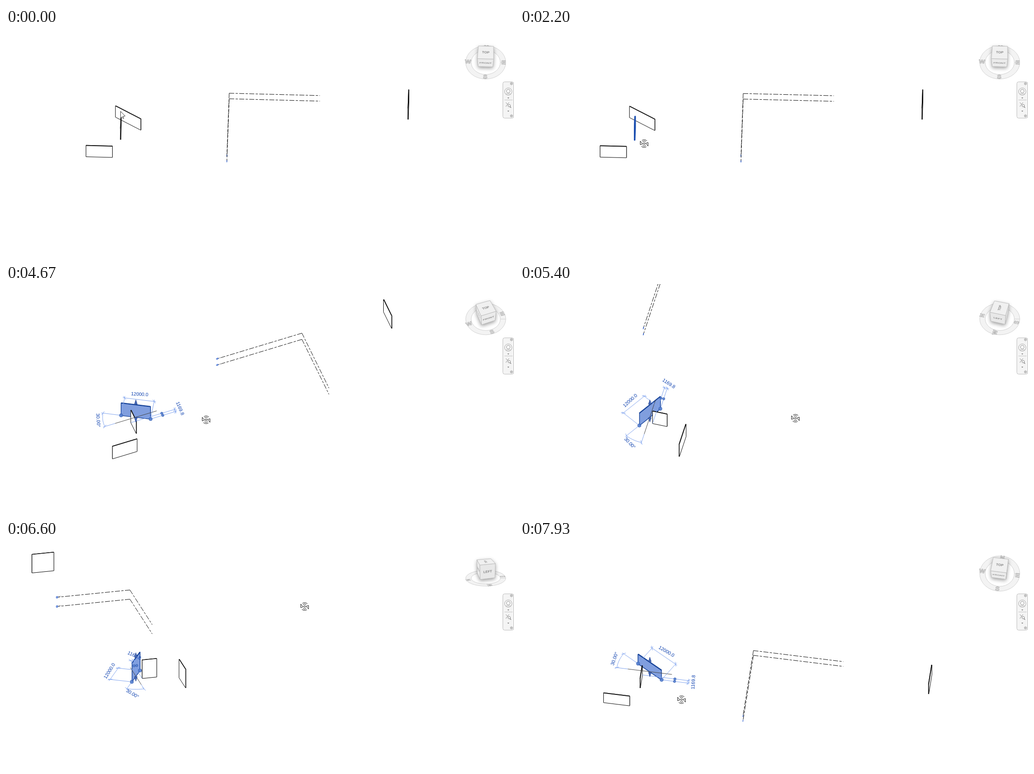
An HTML page with a canvas for the animation above (8000 ms loop, 1115 px wide and 502 px high).

```html
<!DOCTYPE html>
<html lang="en">
<head>
<meta charset="utf-8">
<title>Orbiting walls</title>
<style>
html, body { margin: 0; width: 100%; height: 100%; overflow: hidden; background: #fff; }
canvas { display: block; }
</style>
</head>
<body>
<canvas id="stage" width="1115" height="502"></canvas>
<script>
const g = document.getElementById('stage').getContext('2d');
const LOOP = 8000, STEP = 1000 / 15, RAD = Math.PI / 180;
const SANS = '"Liberation Sans", Arial, sans-serif';
const BLUE = '#1c4fb0', DIM = '#7fa3ee', INK = '#0a0a0a';

// time, yaw, pitch, cursor x, cursor y
const keys = [
  [1600, 1.8, 56.5, 258, 250], [2200, 1.7, 56.3, 272, 254], [2400, -4, 55.2, 290, 246],
  [2850, -24, 54, 338, 238], [3267, -8.5, 50.5, 301, 207], [4334, -8.5, 50.5, 380, 290],
  [5200, -62, 54.5, 565, 305], [5400, -75.3, 52.3, 604, 295], [6067, -116, 37, 690, 215],
  [6600, -104.25, 23.3, 655, 146], [7000, -78, 44, 575, 270], [7400, -40.2, 60.7, 470, 361],
  [7933, 8, 61.7, 354, 351]
];
// time, x, y of the arrow pointer
const arrowKeys = [
  [0, 251, 183], [130, 251, 194], [270, 251, 194], [800, 262, 201],
  [3333, 300, 206], [4000, 283, 272]
];

const TALL = 22.15;             // half the wall height
const wall = (x, y, len, deg) => ({
  x, y, dx: Math.cos(deg * RAD) * len / 2, dy: Math.sin(deg * RAD) * len / 2
});
const A = wall(0, 0, 65.5, -30), B = wall(-60.9, -90.2, 58, 0);
const C = wall(-15.4, -26.8, 33, 90), D = wall(613.6, 54.7, 49.5, 90);
const box = { w: 219.5, e: 418.5, n: 72.2, s: -92.8 };

let cam;

function slope(list, i, c) {
  if (i <= 0 || i >= list.length - 1) return 0;
  const rate = j => (list[j + 1][c] - list[j][c]) / (list[j + 1][0] - list[j][0]);
  const p = rate(i - 1), q = rate(i);
  return p * q <= 0 ? 0 : 2 * p * q / (p + q);
}

function sample(list, t, c) {
  const last = list.length - 1;
  if (t <= list[0][0]) return list[0][c];
  if (t >= list[last][0]) return list[last][c];
  let i = 0;
  while (t > list[i + 1][0]) i++;
  const h = list[i + 1][0] - list[i][0], s = (t - list[i][0]) / h, r = 1 - s;
  return list[i][c] * (1 + 2 * s) * r * r + list[i + 1][c] * (3 - 2 * s) * s * s
    + h * s * r * (slope(list, i, c) * r - slope(list, i + 1, c) * s);
}

function setCamera(t) {
  const yaw = sample(keys, t, 1), pitch = sample(keys, t, 2) * RAD;
  cam = {
    yaw, ca: Math.cos(yaw * RAD), sa: Math.sin(yaw * RAD),
    ce: Math.cos(pitch), se: Math.sin(pitch), ox: 284.5, oy: 279
  };
  if (t < 4390) {
    const [x, y] = turn(D.x, D.y, 0);
    cam.ox = 882.8 - x;
    cam.oy = 168 - y;
  }
}

const depth = (x, y) => y * cam.ca - x * cam.sa;
const turn = (x, y, z) => [x * cam.ca + y * cam.sa, -depth(x, y) * cam.se - z * cam.ce];
function at(x, y, z) {
  const p = turn(x, y, z);
  return [p[0] + cam.ox, p[1] + cam.oy];
}
const floor = (x, y) => at(x, y, -TALL);

function path(pts, closed) {
  g.beginPath();
  pts.forEach(p => g.lineTo(p[0], p[1]));
  if (closed) g.closePath();
}
function line(pts, color, width = 1) {
  path(pts);
  g.strokeStyle = color;
  g.lineWidth = width;
  g.stroke();
}
function shape(pts, fill, color, width = 1) {
  path(pts, true);
  g.fillStyle = fill;
  g.fill();
  g.strokeStyle = color;
  g.lineWidth = width;
  g.stroke();
}
function disc(x, y, r, fill, color) {
  g.beginPath();
  g.arc(x, y, r, 0, 7);
  if (fill) { g.fillStyle = fill; g.fill(); }
  g.strokeStyle = color;
  g.lineWidth = 1;
  g.stroke();
}

function drawWall(w, hot, picked) {
  const len = Math.hypot(w.dx, w.dy), nx = -w.dy / len * .5, ny = w.dx / len * .5;
  const side = depth(nx, ny) > 0 ? 1 : -1;
  const quad = k => [[-1, 1], [1, 1], [1, -1], [-1, -1]].map(([s, z]) =>
    at(w.x + w.dx * s + nx * k, w.y + w.dy * s + ny * k, z * TALL));
  const back = quad(side), front = quad(-side);
  const color = picked ? '#123f96' : hot ? BLUE : INK, width = hot ? 2.4 : picked ? 1.4 : 1;
  g.lineJoin = 'round';
  if (!picked) shape(back, '#fff', color, width);
  shape(front, picked ? 'rgba(74,118,208,.7)' : '#fff', color, width);
  line([back[0], back[1]], color, width);
}

function drawLevels() {
  const corners = [[box.w, box.n], [box.e, box.n], [box.e, box.s], [box.w, box.s]];
  let far = 0;
  corners.forEach((c, i) => { if (depth(...c) > depth(...corners[far])) far = i; });
  const mid = corners[far], right = corners[(far + 1) % 4], left = corners[(far + 3) % 4];
  for (const z of [0, -TALL]) {
    const m = at(...mid, z), l = at(...left, z);
    g.setLineDash([11, 3, 5, 3]);
    line([m, l], INK);
    line([m, at(...right, z)], INK);
    g.setLineDash([]);
    drawHead(l, m);
  }
}

// A small disc standing upright in the plane of its level line.
function drawHead(p, m) {
  const span = box.e - box.w, ux = (m[0] - p[0]) / span, uy = (m[1] - p[1]) / span;
  g.save();
  g.transform(ux, uy, 0, cam.ce, p[0], p[1]);
  g.beginPath();
  g.arc(0, 0, 2.3, 0, 7);
  g.restore();
  g.fillStyle = '#9db9ee';
  g.fill();
  g.strokeStyle = '#2456c8';
  g.lineWidth = 1;
  g.stroke();
  if (Math.abs(ux) > .75) line([[p[0] + 3, p[1] - 1.5], [p[0] + 10, p[1] - 2.5]], '#aaa');
}

function label(text, x, y, deg) {
  g.save();
  g.translate(x, y);
  g.rotate((deg - 180 * Math.round(deg / 180)) * RAD);
  g.font = '10.5px ' + SANS;
  g.textAlign = 'center';
  g.textBaseline = 'middle';
  g.fillStyle = '#0b3fae';
  g.fillText(text, 0, 0);
  g.restore();
}

function tick([x, y], deg) {
  const c = Math.cos((deg + 45) * RAD) * 5, s = Math.sin((deg + 45) * RAD) * 5;
  line([[x - c, y - s], [x + c, y + s]], DIM);
}

// Dimension text and ticks for a segment, placed away from the wall.
function measure(text, p, q, skew, gap) {
  const deg = Math.atan2(q[1] - p[1], q[0] - p[0]) / RAD, turned = deg + skew;
  const base = floor(0, 0), mx = (p[0] + q[0]) / 2, my = (p[1] + q[1]) / 2;
  let nx = -Math.sin(turned * RAD), ny = Math.cos(turned * RAD);
  if (nx * (mx - base[0]) + ny * (my - base[1]) < 0) { nx = -nx; ny = -ny; }
  tick(p, deg);
  tick(q, deg);
  label(text, mx + nx * gap, my + ny * gap, turned);
}

function longer(p, q, by) {
  const d = Math.hypot(q[0] - p[0], q[1] - p[1]) || 1;
  return [q[0] + (q[0] - p[0]) / d * by, q[1] + (q[1] - p[1]) / d * by];
}

function drawDims() {
  const skew = -6 - (cam.yaw - 8) * .33;
  const ends = [-1, 1].map(s => [A.dx * s, A.dy * s]);
  line([floor(-49, 0), floor(49, 0)], '#444');

  const off = ends.map(([x, y]) => floor(x + 24.8, y + 42.9));
  ends.forEach((e, i) => {
    const p = floor(...e);
    line([longer(off[i], p, -5), longer(p, off[i], 4)], DIM);
  });
  line([longer(off[1], off[0], 4), longer(off[0], off[1], 4)], DIM);
  measure('12000.0', off[0], off[1], -4, 11.5);

  const ray = (deg, r) => floor(Math.cos(deg * RAD) * r, Math.sin(deg * RAD) * r);
  const arc = [];
  for (let d = 150; d <= 180; d += 3) arc.push(ray(d, 73));
  line(arc, DIM);
  line([ray(150, 33), ray(150, 77)], DIM);
  line([ray(180, 49), ray(180, 77)], DIM);
  measure('30.00°', arc[0], arc[arc.length - 1], skew, 13);

  const y1 = -10.3, y2 = -16.5, p = floor(87, y1), q = floor(87, y2);
  line([floor(-15.4, y1), floor(90, y1)], DIM);
  line([floor(28.4, y2), floor(90, y2)], DIM);
  line([longer(q, p, 4), longer(p, q, 4)], DIM);
  measure('1169.8', p, q, skew, 11.5);

  const knob = 'rgba(84,126,208,.85)', rim = '#3a64b4';
  [y1, y2].forEach(y => disc(...floor(57, y), 2.6, knob, rim));
  ends.forEach(e => disc(...floor(...e), 3.7, knob, rim));
  const reach = TALL * cam.ce + 1;
  for (const s of [-1, 1]) {
    const y = cam.oy + s * reach, x = cam.ox;
    shape([[x - 3.2, y], [x + 3.2, y], [x, y + s * 10]], '#4468b8', '#27458c', .8);
  }
}

function drawCompass() {
  const cx = 1052.5, cy = 62.5, ringY = cy + 23 * cam.ce;
  g.beginPath();
  g.ellipse(cx, ringY, 44, 44 * cam.se, 0, 0, 7);
  g.ellipse(cx, ringY, 32, 32 * cam.se, 0, 0, 7);
  g.fillStyle = '#f3f3f3';
  g.fill('evenodd');
  g.strokeStyle = '#d2d2d2';
  g.lineWidth = 1;
  g.stroke();

  g.textAlign = 'center';
  g.textBaseline = 'middle';
  [['N', 0, 1], ['E', 1, 0], ['S', 0, -1], ['W', -1, 0]].forEach(([s, x, y]) => {
    const p = turn(x * 39, y * 39, -23);
    g.save();
    g.translate(cx + p[0], cy + p[1]);
    g.scale(1, cam.se);
    g.rotate(cam.yaw * RAD);
    g.font = 'bold 14px ' + SANS;
    g.fillStyle = '#f6f6f6';
    g.strokeStyle = '#a9a9a9';
    g.lineWidth = 1;
    g.fillText(s, 0, 0);
    g.strokeText(s, 0, 0);
    g.restore();
  });
  drawCube(cx, cy);
}

function drawCube(cx, cy) {
  const H = 16.3;
  const spot = (x, y, z) => {
    const p = turn(x, y, z), near = z * cam.se - depth(x, y) * cam.ce, k = 1 + near * .004;
    return [cx + p[0] * k, cy + p[1] * k];
  };
  // name, normal, text right, text up, shade
  const faces = [
    ['FRONT', [0, -1, 0], [1, 0, 0], [0, 0, 1], '#ebebeb'],
    ['BACK', [0, 1, 0], [-1, 0, 0], [0, 0, 1], '#ebebeb'],
    ['LEFT', [-1, 0, 0], [0, -1, 0], [0, 0, 1], '#e8e8e8'],
    ['RIGHT', [1, 0, 0], [0, 1, 0], [0, 0, 1], '#e8e8e8'],
    ['TOP', [0, 0, 1], [1, 0, 0], [0, 1, 0], '#f0f0f0']
  ].filter(f => f[1][2] * cam.se - depth(f[1][0], f[1][1]) * cam.ce > .02);
  const point = (n, r, u, a, b) => spot(...n.map((v, i) => (v + r[i] * a + u[i] * b) * H));
  const quad = ([, n, r, u]) =>
    [[-1, 1], [1, 1], [1, -1], [-1, -1]].map(([a, b]) => point(n, r, u, a, b));

  g.save();
  g.shadowColor = 'rgba(0,0,0,.4)';
  g.shadowBlur = 9;
  g.shadowOffsetY = 3;
  faces.forEach(f => { path(quad(f), true); g.fillStyle = f[4]; g.fill(); });
  g.restore();
  faces.forEach(f => shape(quad(f), f[4], '#b4b4b4', .8));

  for (const [name, n, r, u] of faces) {
    const o = point(n, r, u, 0, 0), x = point(n, r, u, 1, 0), y = point(n, r, u, 0, -1);
    g.save();
    g.transform((x[0] - o[0]) / H, (x[1] - o[1]) / H, (y[0] - o[0]) / H, (y[1] - o[1]) / H, o[0], o[1]);
    g.font = 'bold 7.6px ' + SANS;
    g.textAlign = 'center';
    g.textBaseline = 'middle';
    g.fillStyle = '#858585';
    g.fillText(name, 0, .5);
    g.restore();
  }
}

function drawNavBar() {
  g.beginPath();
  g.roundRect(1090.5, 118.5, 24, 80, 4);
  g.fillStyle = '#f4f4f4';
  g.fill();
  g.strokeStyle = '#bdbdbd';
  g.lineWidth = 1;
  g.stroke();
  const gray = '#8d8d8d';
  for (const y of [122.5, 193.5]) {
    disc(1109.5, y, 2.6, '#ddd', '#a0a0a0');
    line([[1108, y], [1111, y]], '#a0a0a0');
  }
  disc(1102.5, 140, 8, '#fafafa', '#a4a4a4');
  disc(1102.5, 139, 4, '#fff', gray);
  line([[1097, 145], [1108, 145]], '#a4a4a4');
  line([[1094, 158.5], [1112, 158.5]], '#c4c4c4');
  for (const y of [153, 182]) {
    path([[1100.5, y], [1104.5, y], [1102.5, y + 2.5]], true);
    g.fillStyle = '#777';
    g.fill();
  }
  line([[1097, 164], [1101, 168]], gray);
  line([[1104, 164], [1101, 168], [1097, 173]], gray);
  disc(1104.5, 171, 2.6, '#fff', '#777');
  line([[1106, 173], [1108.5, 175.5]], '#777', 1.4);
}

function drawArrow(x, y) {
  shape([[0, 0], [0, 15], [3.4, 11.8], [5.4, 16], [7.2, 15.2], [5.4, 11], [10, 10.4]]
    .map(p => [x + p[0], y + p[1]]), '#fff', '#333', 1);
}

function drawOrbit(x, y) {
  for (const s of [1, -1]) {
    const turnBy = s > 0 ? 0 : 180;
    for (const [r, from, to] of [[8.5, 235, 315], [5.5, 230, 310]]) {
      g.beginPath();
      g.arc(x, y, r, (from + turnBy) * RAD, (to + turnBy) * RAD);
      g.strokeStyle = '#111';
      g.lineWidth = 1;
      g.stroke();
    }
    shape([[-8.5, -5.5], [-8.5, 2.5], [-3.5, .5]].map(p => [x + p[0] * s, y + p[1] * s]), '#fff', '#111');
  }
  disc(x, y, 2, '#fff', '#111');
}

function draw(t) {
  setCamera(t);
  g.fillStyle = '#fff';
  g.fillRect(0, 0, 1115, 502);
  const picked = t >= 4190;
  const hotA = (t >= 395 && t < 795) || (t >= 3795 && !picked);
  const hotC = t >= 1595 && t < 3460;
  drawNavBar();
  g.save();
  g.translate(.5, .5);          // centre thin lines on pixels
  drawLevels();
  [A, B, C, D].sort((p, q) => depth(q.x, q.y) - depth(p.x, p.y))
    .forEach(w => drawWall(w, w === A ? hotA : w === C && hotC, w === A && picked));
  if (picked) drawDims();
  drawCompass();
  const orbit = (t >= 1595 && t < 3390) || t >= 4390;
  if (orbit) drawOrbit(sample(keys, t, 3), sample(keys, t, 4));
  else drawArrow(sample(arrowKeys, t, 1), sample(arrowKeys, t, 2));
  g.restore();
}

function tickFrame() {
  const t = performance.now() % LOOP;
  draw(Math.min(119, Math.floor((t + 4) / STEP)) * STEP);
  requestAnimationFrame(tickFrame);
}
tickFrame();
</script>
</body>
</html>
```
